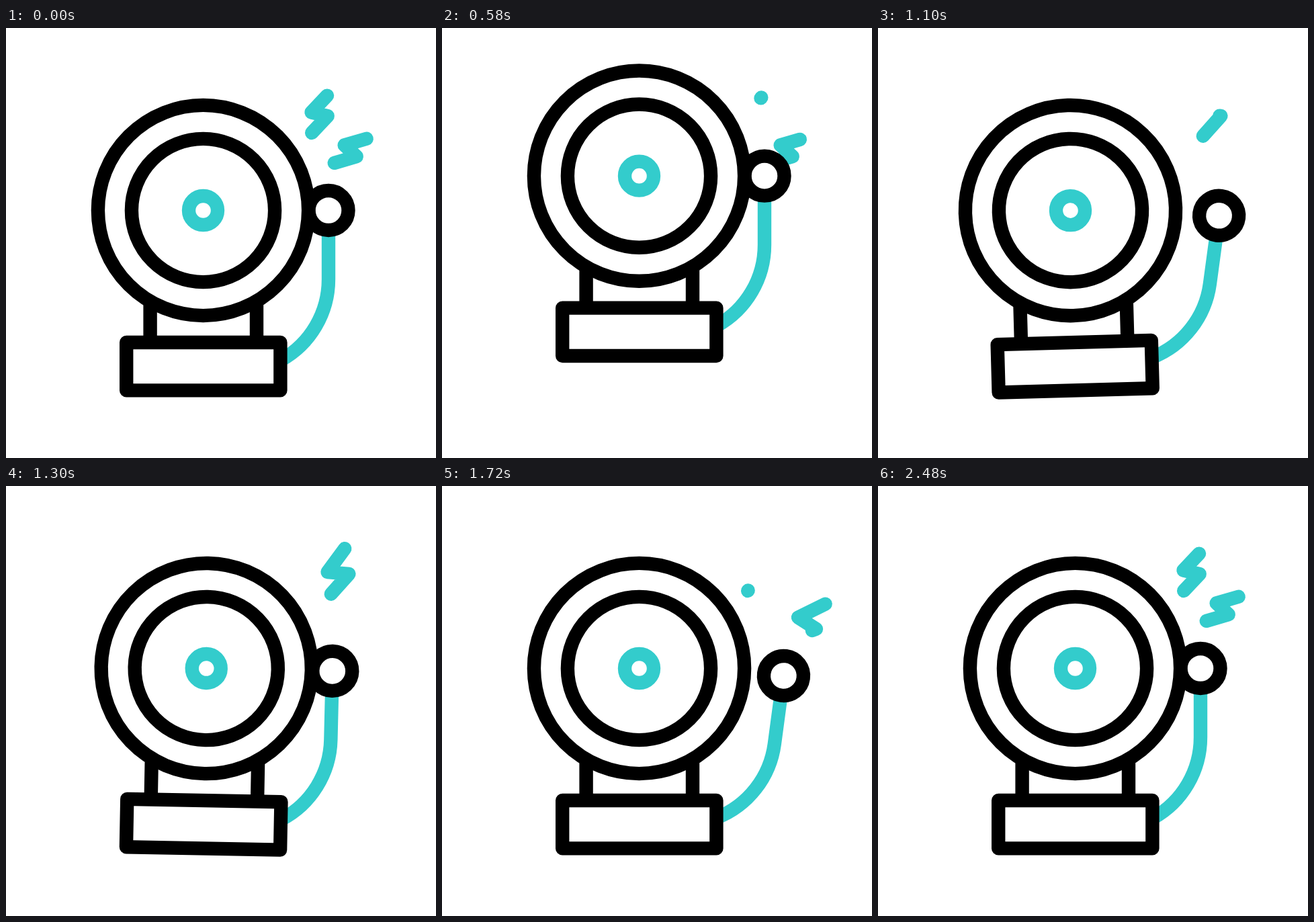
These frames come from a looping animation (640 by 640 pixels, 3.56 s). An HTML page with a canvas:

```html
<!DOCTYPE html>
<html lang="en">
<head>
<meta charset="utf-8">
<title>Alarm bell</title>
<style>
html, body { margin: 0; width: 100%; height: 100%; overflow: hidden; background: #fff; }
canvas { display: block; width: 100vmin; height: 100vmin; }
</style>
</head>
<body>
<canvas id="stage" width="640" height="640"></canvas>
<script>
const ctx = document.getElementById('stage').getContext('2d');
const LOOP = 3560, MOTION_END = 2480, TRACE = 385;
const TEAL = '#33cccc', BLACK = '#000', STROKE = 20.4;
const SMALL = { tip: 30, tail: 30, side: 12.4, bend: 100 };
const BIG = { tip: 46, tail: 33, side: 16, bend: 104 };

const rad = degrees => degrees * Math.PI / 180;
const clamp = u => Math.min(1, Math.max(0, u));
const smooth = u => u * u * (3 - 2 * u);
const ramp = (t, from, to) => smooth(clamp((t - from) / (to - from)));
const trace = (t, from) => ramp(t, from, from + TRACE);

const jump = t => 53.3 * (ramp(t, 650, 1015) - ramp(t, 190, 632));

// Leans right, rocks from side to side, then settles.
function tilt(t) {
  const rock = Math.cos(Math.PI * Math.max(0, t - 960) / 212);
  return 3.2 * rock * ramp(t, 740, 960) * (1 - ramp(t, 1595, 1715));
}

// Three equal strokes, each out and back.
function swing(t) {
  if (t < 748 || t >= MOTION_END) return 0;
  const phase = (t - 748) / 291 % 2;
  return 10.5 * smooth(1 - Math.abs(1 - phase));
}

function rotateAt(x, y, degrees) {
  ctx.translate(x, y);
  ctx.rotate(rad(degrees));
  ctx.translate(-x, -y);
}

function ring(x, y, r, color) {
  ctx.beginPath();
  ctx.arc(x, y, r, 0, Math.PI * 2);
  ctx.strokeStyle = color;
  ctx.stroke();
}

// A zigzag traced from tail to tip; start and end are shares of its length.
function bolt(x, y, turn, { tip, tail, side, bend }, start, end) {
  if (end - start < 0.0005) return;
  const dx = side * Math.cos(rad(bend)), dy = side * Math.sin(rad(bend));
  const length = Math.hypot(tail + dx, dy) + 2 * side + Math.hypot(tip - dx, dy);
  ctx.save();
  ctx.translate(x, y);
  ctx.rotate(rad(turn));
  ctx.beginPath();
  ctx.moveTo(-tail, 0);
  ctx.lineTo(-dx, dy);
  ctx.lineTo(dx, -dy);
  ctx.lineTo(tip, 0);
  ctx.lineCap = 'round';
  ctx.strokeStyle = TEAL;
  if (end - start < 1) {
    ctx.setLineDash([(end - start) * length, length * 2]);
    ctx.lineDashOffset = -start * length;
  }
  ctx.stroke();
  ctx.restore();
}

function bolts(t) {
  const leaving = t < 1000;
  const small = (x, y, turn, out, back) =>
    bolt(x, y, turn, SMALL, leaving ? trace(t, out) : 0, leaving ? 1 : trace(t, back));
  const big = (x, y, turn, from, out) =>
    bolt(x, y, turn, BIG, trace(t, out), trace(t, from));
  small(466.6, 128.3, -67.5, 223, 1700);
  small(512.7, 182.8, -37, 470, 2091);
  big(494.5, 129.5, -71, 945, 1315);
  big(543.5, 204.2, -43.5, 1300, 1585);
}

function hammer(angle) {
  ctx.save();
  rotateAt(412, 490, angle);
  ctx.strokeStyle = TEAL;
  ctx.beginPath();
  ctx.moveTo(480, 300);
  ctx.arc(342.3, 374, 137.7, 0, 1.06);
  ctx.stroke();
  ctx.fillStyle = '#fff';
  ctx.beginPath();
  ctx.arc(480, 271.5, 29, 0, Math.PI * 2);
  ctx.fill();
  ring(480, 271.5, 29.5, BLACK);
  ctx.restore();
}

function bell() {
  ring(293.5, 271.5, 156.6, BLACK);
  ring(293.5, 271.5, 106.6, BLACK);
  ring(293.5, 271.5, 21.5, TEAL);
  ctx.strokeStyle = BLACK;
  ctx.beginPath();
  for (const x of [214.6, 373]) {
    ctx.moveTo(x, 409);
    ctx.lineTo(x, 468);
  }
  ctx.stroke();
  ctx.fillStyle = '#fff';
  ctx.fillRect(179.2, 468, 229.2, 71.4);
  ctx.strokeRect(179.2, 468, 229.2, 71.4);
}

function draw(t) {
  ctx.fillStyle = '#fff';
  ctx.fillRect(0, 0, 640, 640);
  ctx.lineWidth = STROKE;
  ctx.lineJoin = 'round';
  bolts(t);
  ctx.save();
  ctx.translate(0, jump(t));
  rotateAt(293.7, 525, tilt(t));
  hammer(swing(t));
  bell();
  ctx.restore();
}

const begin = performance.now();
function tick() {
  draw((performance.now() - begin) % LOOP);
  requestAnimationFrame(tick);
}
tick();
</script>
</body>
</html>
```
